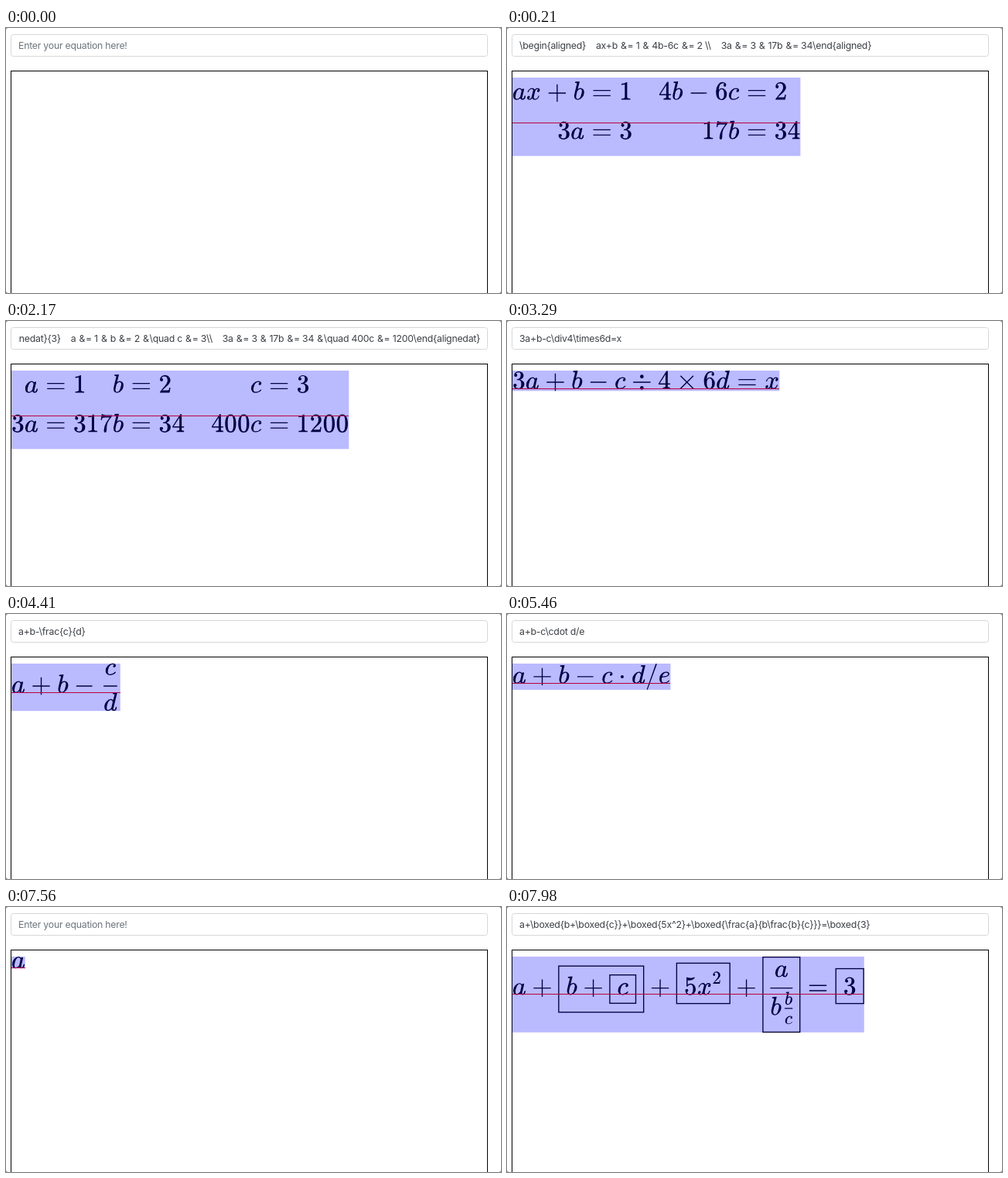
An HTML page that plays this animation: 640 px wide and 342 px high, repeating every 8 s.

```html
<!DOCTYPE html>
<html lang="en">
<head>
<meta charset="utf-8">
<title>Equation preview</title>
<style>
  html, body { margin: 0; width: 100%; height: 100%; overflow: hidden; background: #777; }
  #stage { position: relative; width: 640px; height: 342px; overflow: hidden; background: #fff; border-radius: 3px; }
  #field, #board { position: absolute; left: 6px; width: 617px; box-sizing: border-box; }
  #field { top: 8px; height: 29px; padding: 0 9px; border: 1px solid #d5d7d9; border-radius: 3.5px; }
  #entry {
    overflow: hidden; white-space: pre; color: #3d4146;
    font: 12.3px/27px Inter, "Open Sans", sans-serif; letter-spacing: -.02em;
  }
  #entry.empty { color: #6c757d; }
  #entry span { margin: 0 .07em; }
  #board { top: 55px; height: 300px; border: 1px solid #000; }
  svg { position: absolute; left: 0; top: 0; }
</style>
</head>
<body>
<div id="stage">
  <div id="field"><div id="entry"></div></div>
  <div id="board"></div>
  <svg id="math" width="640" height="342"></svg>
</div>
<script>
// Math lengths are in hundredths of an em; glyph outlines have y pointing up.
const UNIT = 0.3385, LOOP = 8000;
const BOWL = 'M35 33Q34 40.5 28 40.5Q21 40.5 16 29Q12 18 12 11Q12 2.6 18 2.6Q24 2.6 30 11Z';
const TAIL = 'L37.4 7Q37.4 2.6 40 2.6Q44 3 46.5 13.5Q47 15.3 50.6 15Q50-1 40-1Q32-1 30 5Q24-1 17-1Q11-1 7 3T3 16Q3 26 11 35T28 44';
const dot = (x, y, r) => `M${x - r} ${y}a${r} ${r} 0 1 0 ${2 * r} 0a${r} ${r} 0 1 0 ${-2 * r} 0Z`;
const bar = (x, y, w) => `M${x} ${y - 2}h${w}v4h${-w}Z`;

// symbol: [advance, outline, space on each side]
const GLYPHS = {
  a: [52.9, 'M45 39' + TAIL + 'Q33 44 37 39Q39 42 41.6 42Q45 42 45 39Z' + BOWL],
  b: [42.9, 'M7.3 65Q7.3 68 9 68.3L23.4 69.4Q25 69.4 24.6 68L17.6 40Q23 44.2 28.3 44.2Q34.5 44.2 38.3 39.6T42.2 28Q42.2 17 34.3 8T17.3-1Q4-1 4 15Q4 18 9.7 41.4Q14.7 61 14.7 62.3Q14 63.7 7.6 63.7Z'
    + 'M33.6 33Q33.6 40.5 27.5 40.5Q21 40.5 15.7 32Q11.4 16 11.4 11Q11.4 2.6 18 2.6Q25 2.6 28.5 11.4Q33.6 26 33.6 33Z'],
  c: [43.3, 'M3.4 16Q3.4 27 12 35.5T30.6 44.2Q42 44 42.7 35.5Q42 28.5 36 28.5Q32 28.5 32 32.5Q32 37.5 36.7 38.6Q35 40.4 30.6 40.4Q21 40 16 29Q12 19 12 12Q12 2.6 20.5 2.6Q32 2.6 39.4 11Q41 13 43 10Q34-1 20-1Q12.7-1 8 3.7T3.4 16Z'],
  d: [52, 'M36.6 68.3L51 69.4Q52.5 69.4 52.3 68.6' + TAIL + 'Q33 44 36.7 39.7L42.4 62Q42 63.7 35.5 63.7Q34.5 67 36.6 68.3Z' + BOWL],
  e: [46.6, 'M4 17Q4 29 13 37T31 44.2Q42 43 42 35.5Q41 22.3 14 22.3Q12.5 16 12.5 13Q12.5 2.6 21 2.6Q32 2.6 39.4 11Q41 13 43 10Q34-1 20.5-1Q12.6-1 8.3 4T4 17Z'
    + 'M37.3 35Q37 40.5 30.5 40.5Q19 40 15 26Q37 26 37.3 35Z'],
  x: [57.2, 'M5.2 29Q6 33 11 38.6T22 44.2Q30 44.2 33 38Q37 44.2 43 44.2Q52 44 52.2 36Q52 29 45.8 28.8Q41.5 29 41.5 33Q42 38 46.5 39Q45 40.4 42 40.4Q37 40 35 33.6Q29 12 29 7.8Q29 2.6 34 2.6Q43 3 46.3 14Q47 15.5 50.4 15Q46-1 33.3-1Q26-1 22.7 5Q19-1 13-1Q4-1 3.5 7Q4 14 10 14.3Q14.2 14 14.2 10Q14 5 9 4Q10 2.6 13 2.6Q17.5 2.6 19.5 7Q21 11 26.6 35Q26.6 40.4 21.7 40.4Q12 40 9.3 29Q9 28 5.8 27.8Z'],
  0: [50, 'M25 67C40 67 46 51 46 32C46 12 40-2 25-2C10-2 4 12 4 32C4 51 10 67 25 67ZM25 63C16 63 14 53 14 33C14 13 16 2 25 2C34 2 36 13 36 33C36 53 34 63 25 63Z'],
  1: [50, 'M21 58Q16 56 8 56V60Q22 61 27 66Q29 67 30 66V9Q30 4.6 42 4.6V0H8V4.6Q21 4.6 21 9Z'],
  2: [50, 'M11 43Q5 43 5 49Q5 56 10 61T23 67Q33 67 39 61T45 46Q45 38 34 27L14 9H34Q39 9 39 10L41 19H45L42 0H5V3L20 21Q34 36 34 46Q34 62 21 62Q14 62 11 55Q17 55 17 49Q17 43 11 43Z'],
  3: [50, 'M13 46Q7 46 7 52Q7 58 12 62T23 66.5Q32 67 37.5 62T43 52Q43 40 30 35Q46 31 46 17.5Q46 10 40 4T24-2Q16-2 10 2T4 13Q4 19 10.5 19T17 13Q17 8 11 7Q16 2 24 2Q34 2 34 18Q34 32 25 33H17V36.5Q32 37 32 53Q32 63 24 63Q17 63 13 58Q19 57 19 52Q19 46 13 46Z'],
  4: [50, 'M47 0H19V4.6Q29 4.6 29 8V16.5H3V21L33 67.7H38V21H47V16.5H38V8Q38 4.6 47 4.6ZM29.3 21V54.5L7.4 21Z'],
  5: [50, 'M16.4 16Q16 10 10 10Q15 2 22 2Q34.5 2 34.5 21Q34.5 38 26 38Q18 38 13.6 31Q13 30 9.5 30.5V66.6Q26 60 40 66.6L41 63.5Q30 51 14 54.6V37.4Q18 42 25.6 42Q34 42 39.5 35.5T45 20Q45 11 38.5 4.5T23-2Q15-2 10 3T5 15.5Q5 21.4 10.7 21.4T16.4 16Z'],
  6: [50, 'M4 31Q4 46 12 57T30 66.6Q43 66 43 55Q43 49.5 38 49.5T32.6 55Q33 59 37 60Q35 62.6 31 62.6Q15 62 14.7 36Q19 43.3 26 43.3Q34 43.3 40 36.5T45.6 20Q45.6 11 39.5 4.5T25-2Q4-1 4 31Z'
    + 'M25.7 39.7Q15 39 14.8 21.6Q15 2 25 2Q35.2 2.5 35.2 21Q35.2 39 25.7 39.7Z'],
  7: [50, 'M5.5 45.5L8.8 67.6H12.8Q13 64.4 25 64.4H48.5V60.5Q39 48 35 42Q27.5 33 27.5 5Q27.5-2 22-2Q17-2 17 4Q17 21 26.5 37L39.5 55H20Q12 55 11.5 54L9.5 45.5Z'],
  '+': [77.8, 'M6 23H37V-8H41V23H72V27H41V58H37V27H6Z', 22.2],
  '-': [77.8, bar(8, 25, 61), 22.2],
  '÷': [77.8, bar(6, 25, 66) + dot(39, 46.7, 7) + dot(39, 3.4, 7), 22.2],
  '×': [77.8, 'M13 48L36 25L13 2L16-1L39 22L62-1L65 2L42 25L65 48L62 51L39 28L16 51Z', 22.2],
  '·': [27.8, dot(13.9, 25, 6), 22.2],
  '=': [77.8, bar(6, 35, 66) + bar(6, 15, 66), 27.8],
  '/': [50, 'M42 75L44.4 73L9-24L7-25L5.6-23L40 74Z']
};

const math = document.getElementById('math');
const entry = document.getElementById('entry');

function add(parent, tag, attrs) {
  const el = document.createElementNS('http://www.w3.org/2000/svg', tag);
  for (const key in attrs) el.setAttribute(key, attrs[key]);
  return parent.appendChild(el);
}

const widthOf = text => [...text].reduce((sum, ch) => {
  const [advance, , side = 0] = GLYPHS[ch];
  return sum + advance + 2 * side;
}, 0);

// Builds one equation: size, baseline below the top, and a routine that draws it.
function equation(width, base, height, draw) {
  const g = add(math, 'g', { transform: `translate(6.9 64) scale(${UNIT})`, 'fill-rule': 'evenodd', visibility: 'hidden' });
  draw({
    put(text, x, y, size = 1) {
      for (const ch of text) {
        const [advance, d, side = 0] = GLYPHS[ch];
        add(g, 'path', { d, transform: `translate(${x + side * size} ${y}) scale(${size} ${-size})` });
        x += (advance + 2 * side) * size;
      }
    },
    rule(x, y, w) { add(g, 'path', { d: bar(x, y, w) }); },
    box(x, top, w, bottom) {
      add(g, 'rect', { x: x + 2, y: top + 2, width: w - 4, height: bottom - top - 4, fill: 'none', stroke: '#000', 'stroke-width': 4 });
    }
  }, base);
  add(g, 'rect', { y: Math.round(base * UNIT - 0.6) / UNIT, width, height: 1 / UNIT, fill: '#f00', 'shape-rendering': 'crispEdges' });
  add(g, 'rect', { width, height, fill: '#00f', 'fill-opacity': 0.27 });
  return g;
}

const line = (text, base, height) =>
  equation(widthOf(text), base, height, ({ put }) => put(text, 0, base));

// Each row alternates right-aligned and left-aligned cells that meet at the joins.
const aligned = (width, joins, rows) => equation(width, 174, 299, ({ put }) =>
  rows.forEach((row, r) => row.forEach((cell, i) => {
    const x = joins[i >> 1];
    put(cell, i % 2 ? x : x - widthOf(cell), 84 + 150 * r);
  })));

const pair = aligned(1100.4, [275.2, 867], [
  ['ax+b', '=1', '4b-6c', '=2'],
  ['3a', '=3', '17b', '=34']
]);
const triple = aligned(1289.3, [102.9, 429.2, 955.9], [
  ['a', '=1', 'b', '=2', 'c', '=3'],
  ['3a', '=3', '17b', '=34', '400c', '=1200']
]);
const chain = line('3a+b-c÷4×6d=x', 69.4, 77.7);
const fraction = equation(416.2, 110.8, 180.5, ({ put, rule }, y) => {
  put('a+b-', 0, y);
  put('c', 356.6, y - 67.7);
  rule(352.2, y - 25, 52);
  put('d', 352.2, y + 68.6);
});
const slash = line('a+b-c·d/e', 75, 100);
const single = line('a', 44.1, 45.2);
const boxes = equation(1343.8, 145, 289, ({ put, rule, box }, y) => {
  put('a+', 0, y);
  box(175.1, y - 111, 328.4, y + 69);
  put('b+', 205.1, y);
  box(370.2, y - 77, 103.3, y + 35);
  put('c', 400.2, y);
  put('+', 503.5, y);
  box(625.7, y - 122, 207.2, y + 36);
  put('5x', 655.7, y);
  put('2', 762.9, y - 41.3, 0.7);
  put('+', 832.9, y);
  box(955.1, y - 145, 145.3, y + 145);
  put('a', 1001.3, y - 67.7);
  rule(985.1, y - 25, 85.3);
  put('b', 985.1, y + 77.5);
  put('b', 1040, y + 38.1, 0.7);
  rule(1040, y + 52.5, 30.4);
  put('c', 1040, y + 112, 0.7);
  put('=', 1100.4, y);
  box(1233.8, y - 101, 110, y + 36);
  put('3', 1263.8, y);
});

const tex = String.raw;
const STEPS = [
  [0, '', null],
  [210, tex`\begin{aligned}    ax+b &= 1 & 4b-6c &= 2 \\    3a &= 3 & 17b &= 34\end{aligned}`, pair],
  [1890, tex`\begin{alignedat}{3}    a &= 1 & b &= 2 &\quad c &= 3\\    3a &= 3 & 17b &= 34 &\quad 400c &= 1200\end{alignedat}`, triple],
  [3150, tex`3a+b-c\div4\times6d=x`, chain],
  [4340, tex`a+b-\frac{c}{d}`, fraction],
  [5460, tex`a+b-c\cdot d/e`, slash],
  [6510, 'a', single],
  [7560, '', single],
  [7840, tex`a+\boxed{b+\boxed{c}}+\boxed{5x^2}+\boxed{\frac{a}{b\frac{b}{c}}}=\boxed{3}`, boxes]
];

let shown = null;
function show(step) {
  if (step === shown) return;
  if (shown && shown[2]) shown[2].setAttribute('visibility', 'hidden');
  const [, text, eq] = shown = step;
  if (eq) eq.setAttribute('visibility', 'visible');
  // Column marks get a little air around them.
  entry.innerHTML = (text || 'Enter your equation here!').replaceAll('&', '<span>&amp;</span>');
  entry.className = text ? '' : 'empty';
  entry.scrollLeft = entry.scrollWidth;
}

const start = performance.now();
function tick() {
  const t = (performance.now() - start) % LOOP;
  show(STEPS.filter(([at]) => at <= t).pop());
  requestAnimationFrame(tick);
}
tick();
</script>
</body>
</html>
```
